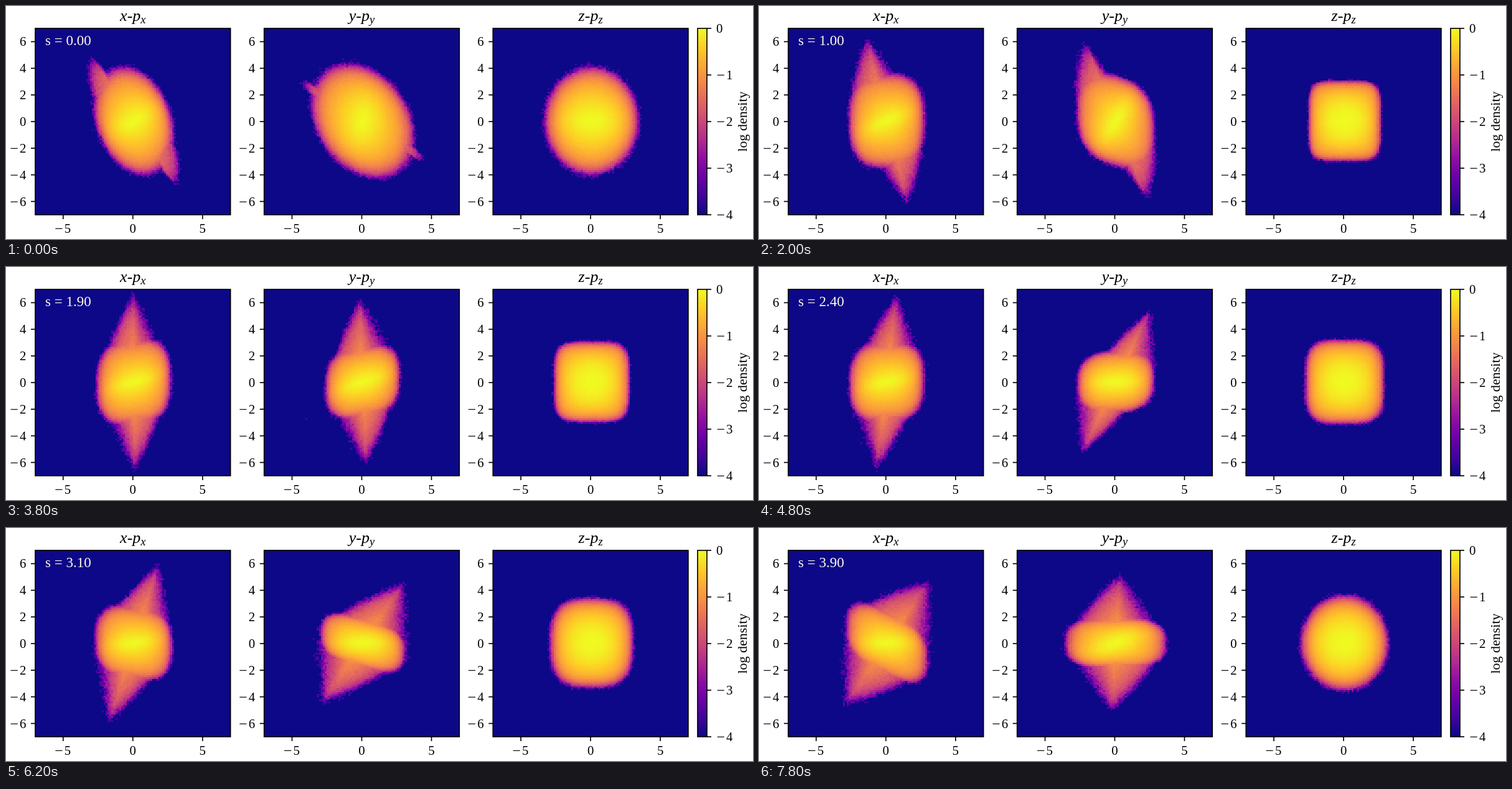
Recreate the animation shown at these times as an HTML page with a canvas. Size 1200x375 px, loop 8000 ms.

```html
<!DOCTYPE html>
<html lang="en">
<head>
<meta charset="utf-8">
<title>Phase space density</title>
<style>
  html, body { margin: 0; width: 100%; height: 100%; overflow: hidden; background: #fff; }
  canvas { display: block; width: 1200px; height: 375px; }
</style>
</head>
<body>
<canvas id="stage" width="1200" height="375"></canvas>
<script>
const ctx = document.getElementById('stage').getContext('2d');
const SERIF = '"Liberation Serif", "Times New Roman", serif';
const STEP_MS = 200, STEPS = 40;
const BINS = 100, HALF = 7, PEAK = 4000, SCALE = 1.03;
const CENTER = { x: 0.07, y: 0.05 };
const TOP = 36, HEIGHT = 300, WIDTH = 313.6;

// Plasma colour map
const STOPS = ['0d0887', '41049d', '6a00a8', '8f0da4', 'b12a90', 'cc4778',
  'e16462', 'f2844b', 'fca636', 'fcce25', 'f0f921']
  .map(h => [0, 2, 4].map(i => parseInt(h.slice(i, i + 2), 16)));
const COLORS = Array.from({ length: 256 }, (_, i) => {
  const f = i / 255 * 10, k = Math.min(9, Math.floor(f));
  return STOPS[k].map((c, j) => Math.round(c + (STOPS[k + 1][j] - c) * (f - k)));
});

const clamp = (v, lo, hi) => Math.max(lo, Math.min(hi, v));
const decay = (s, rate) => Math.exp(-rate * s);

// The arm swings across the x panel at a steady rate.
function shapeX(s) {
  const bend = (s - 1.9) ** 2;
  const side = [2.7 + 0.06 * bend, 0.4 - 0.6 * bend];
  return {
    tip: [-2.9 + 1.5 * s, 6.5 - 0.5 * bend],
    side,
    wide: [side[0], 0.6 * side[1]],
    high: [0, 4 - 0.37 * s],
    power: 2.8 - 0.8 * decay(s, 3),
    core: [1, 0.47 + 0.2 * decay(s, 3), 0.65 - 0.17 * s]
  };
}

// Key points of the y arm: time, tip x, tip y, side y.
const Y_PATH = [
  [0, -3.9, 2.9, -2], [0.5, -2.6, 5.2, -2], [1.4, -1.7, 6, -1], [1.9, -0.2, 6.1, 0.7],
  [2.4, 2.4, 5.3, 0.4], [3.1, 2.9, 4.4, -1.2], [3.9, 0.3, 5, 0]
];

function along(path, s) {
  const k = Math.max(1, path.findIndex(p => p[0] >= s));
  const a = path[k - 1], b = path[k], f = (s - a[0]) / (b[0] - a[0]);
  return a.map((v, i) => v + (b[i] - v) * f);
}

function shapeY(s) {
  const [, tipX, tipY, sideY] = along(Y_PATH, s);
  const side = [2.7 + 0.2 * (s - 1.7) ** 2 + 0.5 * decay(s, 3), sideY];
  return {
    tip: [tipX, tipY],
    side,
    wide: [side[0], 0.6 * sideY],
    high: [0, Math.max(2, 4.2 - 0.75 * s)],
    power: 2.8 - 0.8 * decay(s, 3),
    core: [1.1, 0.47 + 0.25 * decay(s, 3), 0.7 + 0.75 * Math.cos(1.08 * s)]
  };
}

// The z panel shrinks to a rounded square, then relaxes to a disc.
function shapeZ(s) {
  const late = Math.max(0, s - 1.4);
  return {
    wide: [2.6 + 0.85 * decay(s, 5) + 0.25 * late, 0],
    high: [0, 2.85 + 1.3 * decay(s, 2) + 0.33 * late],
    power: 5 - 3 * decay(s, 6) - 1.2 * late,
    core: [1.25, 1.25 - 0.3 * decay(s, 5), 0]
  };
}

const PANELS = [
  { left: 47, name: 'x', shape: shapeX },
  { left: 414.7, name: 'y', shape: shapeY },
  { left: 782.3, name: 'z', shape: shapeZ }
];

const cross = (a, b) => a[0] * b[1] - a[1] * b[0];

// Coordinates of p in the skewed basis (a, b).
function inBasis(p, a, b) {
  const area = cross(a, b);
  return [cross(p, b) / area, cross(a, p) / area];
}

// 1 on the edge of a superellipse, 0 in its centre.
const gauge = ([u, v], n) => (Math.abs(u) ** n + Math.abs(v) ** n) ** (1 / n);

function bodyLog(p, { wide, high, power, core }) {
  const g = gauge(inBasis(p, wide, high), power);
  if (g > 1.6) return -9;
  const [a, b, tilt] = core, c = Math.cos(tilt), s = Math.sin(tilt);
  const inner = Math.hypot((p[0] * c + p[1] * s) / a, (p[1] * c - p[0] * s) / b);
  const depth = 1.5;
  const fall = clamp(Math.log(0.17 / depth) / Math.log(Math.min(0.95, g / inner)), 0.9, 5);
  return -depth * g ** fall - (4 - depth) * g ** (4 + 2.5 * power);
}

// Diamond between tip and side, fading toward its hollow flank.
function armLog(p, { tip, side }) {
  const uv = inBasis(p, tip, side), g = gauge(uv, 1.2);
  if (g > 1.6) return -9;
  return -0.6 - 1.5 * g - 1.9 * g ** 10 - 4 * Math.max(0, uv[0] * uv[1]);
}

function seeded(seed) {
  return () => {
    seed = (seed + 0x6D2B79F5) | 0;
    let t = Math.imul(seed ^ (seed >>> 15), 1 | seed);
    t = (t + Math.imul(t ^ (t >>> 7), 61 | t)) ^ t;
    return ((t ^ (t >>> 14)) >>> 0) / 4294967296;
  };
}

// Poisson counting noise
function sampleCount(mean, rnd) {
  if (mean > 12) return mean + Math.sqrt(mean) * (rnd() + rnd() + rnd() - 1.5) * 2;
  let u = rnd(), k = 0, p = Math.exp(-mean);
  while (u > p && k < 40) { u -= p; p *= mean / ++k; }
  return k;
}

const grid = document.createElement('canvas');
grid.width = grid.height = BINS;
const gridCtx = grid.getContext('2d');
const image = gridCtx.createImageData(BINS, BINS);

function drawDensity(panel, s, seed) {
  const shape = panel.shape(s), rnd = seeded(seed);
  for (let j = 0; j < BINS; j++) {
    for (let i = 0; i < BINS; i++) {
      const p = [
        (((i + 0.5) / BINS * 2 - 1) * HALF - CENTER.x) / SCALE,
        ((1 - (j + 0.5) / BINS * 2) * HALF - CENTER.y) / SCALE
      ];
      const body = bodyLog(p, shape);
      const log = shape.tip ? Math.max(body, armLog(p, shape)) : body;
      const count = sampleCount(PEAK * 10 ** log, rnd);
      const level = count > 0 ? clamp(Math.log10(count / PEAK), -4, 0) : -4;
      const color = COLORS[Math.round((level + 4) / 4 * 255)];
      image.data.set([...color, 255], (j * BINS + i) * 4);
    }
  }
  gridCtx.putImageData(image, 0, 0);
  ctx.imageSmoothingEnabled = false;
  ctx.drawImage(grid, panel.left, TOP, WIDTH, HEIGHT);
}

function text(str, x, y, size, align = 'left', style = '') {
  ctx.font = `${style} ${size}px ${SERIF}`;
  ctx.textAlign = align;
  ctx.fillText(str, x, y);
}

// Tick number whose digit starts at x.
function number(n, x, y) {
  text(String(Math.abs(n)), x, y, 20.8);
  if (n < 0) text('\u2212', x - 2, y + 1, 24, 'right');
}

function line(x1, y1, x2, y2) {
  ctx.beginPath();
  ctx.moveTo(x1, y1);
  ctx.lineTo(x2, y2);
  ctx.stroke();
}

function drawTitle(name, center) {
  const parts = [[name, 26, 'italic', 0], ['-', 26, '', 0], ['p', 26, 'italic', 0], [name, 18.5, 'italic', 4]];
  const widths = parts.map(([str, size, style]) => {
    ctx.font = `${style} ${size}px ${SERIF}`;
    return ctx.measureText(str).width;
  });
  let x = center - widths.reduce((a, b) => a + b) / 2;
  parts.forEach(([str, size, style, drop], i) => {
    text(str, x, 24 + drop, size, 'left', style);
    x += widths[i];
  });
}

function drawAxes({ left, name }) {
  const mid = left + WIDTH / 2;
  ctx.strokeRect(left, TOP, WIDTH, HEIGHT);
  for (let v = -6; v <= 6; v += 2) {
    const y = TOP + HEIGHT / 2 - v * HEIGHT / 14;
    line(left - 7, y, left, y);
    number(v, left - 25, y + 7);
  }
  for (let v = -5; v <= 5; v += 5) {
    const x = mid + v * WIDTH / 14;
    line(x, TOP + HEIGHT, x, TOP + HEIGHT + 7);
    number(v, x + (v < 0 ? 2 : -5.2), 365);
  }
  drawTitle(name, mid);
}

function drawColorbar() {
  const left = 1111, width = 15;
  for (let y = 0; y < HEIGHT; y++) {
    ctx.fillStyle = `rgb(${COLORS[Math.floor((1 - (y + 0.5) / HEIGHT) * 256)]})`;
    ctx.fillRect(left, TOP + y, width, 1);
  }
  ctx.fillStyle = '#000';
  ctx.strokeRect(left, TOP, width, HEIGHT);
  for (let v = 0; v >= -4; v--) {
    const y = TOP - v * HEIGHT / 4;
    line(left + width, y, left + width + 7, y);
    number(v, v < 0 ? 1157 : 1141, y + 7);
  }
  ctx.save();
  ctx.translate(1190, TOP + HEIGHT / 2);
  ctx.rotate(-Math.PI / 2);
  text('log density', 0, 0, 22, 'center');
  ctx.restore();
}

function draw(step) {
  const s = step / 10;
  ctx.fillStyle = '#fff';
  ctx.fillRect(0, 0, 1200, 375);
  ctx.strokeStyle = '#000';
  ctx.lineWidth = 1.67;
  PANELS.forEach((panel, i) => {
    drawDensity(panel, s, step * 7919 + i * 104729 + 17);
    ctx.fillStyle = '#000';
    drawAxes(panel);
  });
  drawColorbar();
  ctx.fillStyle = '#fff8e8';
  text(`s = ${s.toFixed(2)}`, 63, 63, 23);
}

let shown = -1;
function tick() {
  const step = Math.floor(performance.now() / STEP_MS) % STEPS;
  if (step !== shown) draw(shown = step);
  requestAnimationFrame(tick);
}
tick();
</script>
</body>
</html>
```
